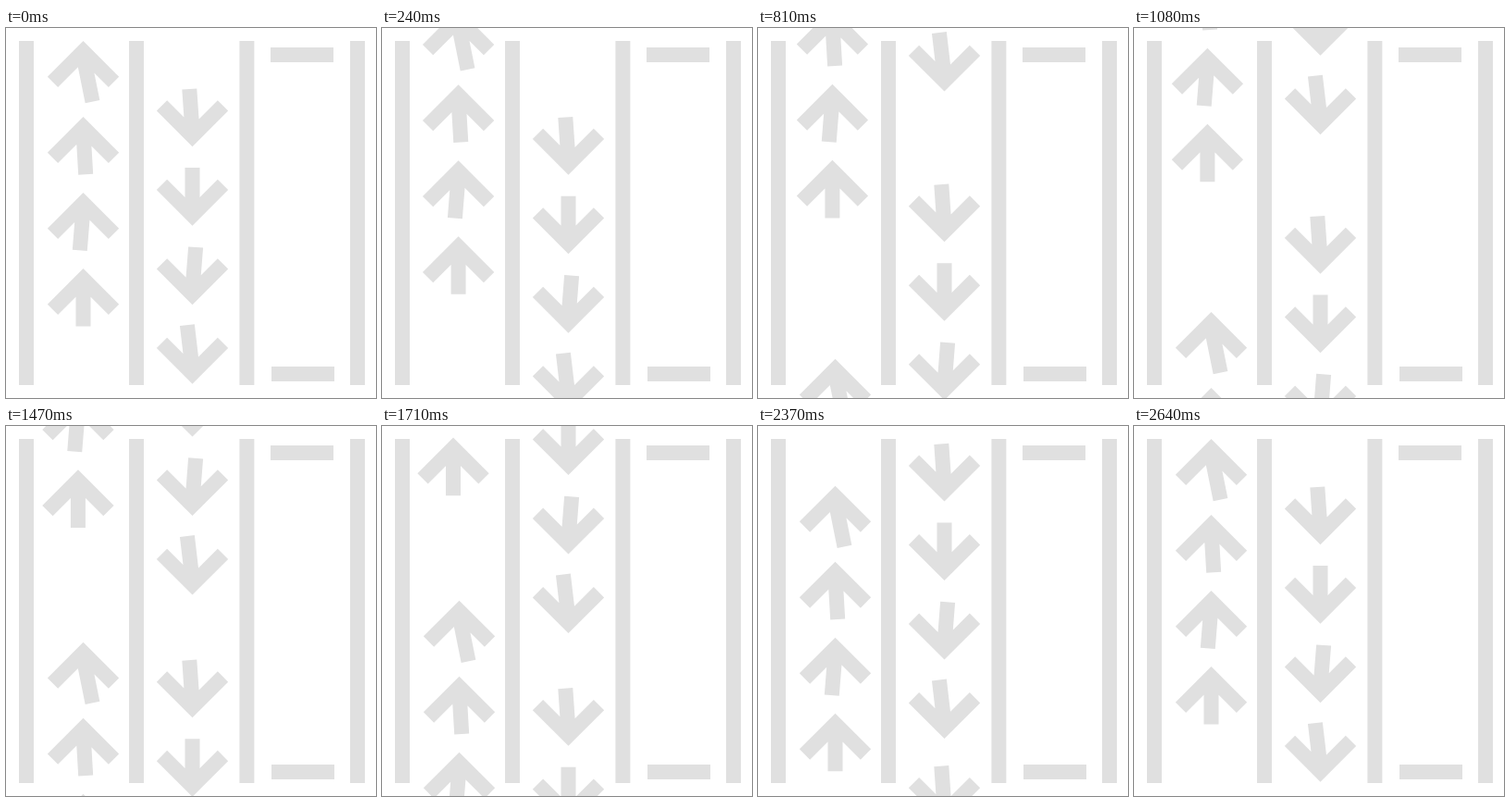
Recreate the animation shown at these times as an HTML page. Size 400 by 400 pixels, loop 2670 ms.

```html
<!DOCTYPE html>
<html lang="en">
<head>
<meta charset="utf-8">
<title>Lanes</title>
<style>
  html, body { margin: 0; width: 100%; height: 100%; overflow: hidden; background: #fff; }
  svg { display: block; width: 100%; height: 100%; }
</style>
</head>
<body>
<svg id="stage" viewBox="0 0 400 400" fill="none" stroke="#e0e0e0" stroke-width="16" stroke-miterlimit="10">
  <path d="M22 14V386M141 14V386M260.4 14V386M380 14V386M286 29H354M287 374H355"/>
</svg>
<script>
const LOOP = 2670, STEP = 30, LAST = LOOP - STEP;
const stage = document.getElementById('stage');

// Each tail is the end point of a stem, measured from the arrow tip.
const up = {
  x: 83.5, y: 14, gap: 82, dir: 1,
  tails: [[10, 65.6], [2.7, 62.2], [-3.7, 62.3], [0, 62.6]]
};
const down = {
  x: 201.5, y: 128.2, gap: 85.5, dir: -1,
  tails: [[-3.2, 62.2], [0, 62.6], [3.6, 62.2], [-5.6, 63.6]]
};

// A row of arrows travels from one offset to another during the loop.
const rows = [
  { lane: up, from: [0, 0], to: [-10, -382] },
  { lane: up, from: [0, 496], to: [0, 0] },
  { lane: down, from: [0, 0], to: [0, 336] },
  { lane: down, from: [0, -456], to: [0, 0] }
];

function arrow(x, y, dir, [tx, ty]) {
  const at = (dx, dy) => `${x + dx} ${y + dir * dy}`;
  return `M${at(-33, 44.3)}L${at(0, 11.3)}L${at(33, 44.3)}M${at(0, 16)}L${at(tx, ty)}`;
}

for (const row of rows) {
  const { x, y, gap, dir, tails } = row.lane;
  row.node = document.createElementNS('http://www.w3.org/2000/svg', 'path');
  row.node.setAttribute('d', tails.map((tail, i) => arrow(x, y + i * gap, dir, tail)).join(''));
  stage.append(row.node);
}

function draw(now) {
  const p = Math.floor((now % LOOP) / STEP) * STEP / LAST;
  for (const { node, from, to } of rows) {
    const [x, y] = from.map((a, i) => a + (to[i] - a) * p);
    node.setAttribute('transform', `translate(${x} ${y})`);
  }
}

const start = performance.now();
function tick() {
  draw(performance.now() - start);
  requestAnimationFrame(tick);
}
tick();
</script>
</body>
</html>
```
